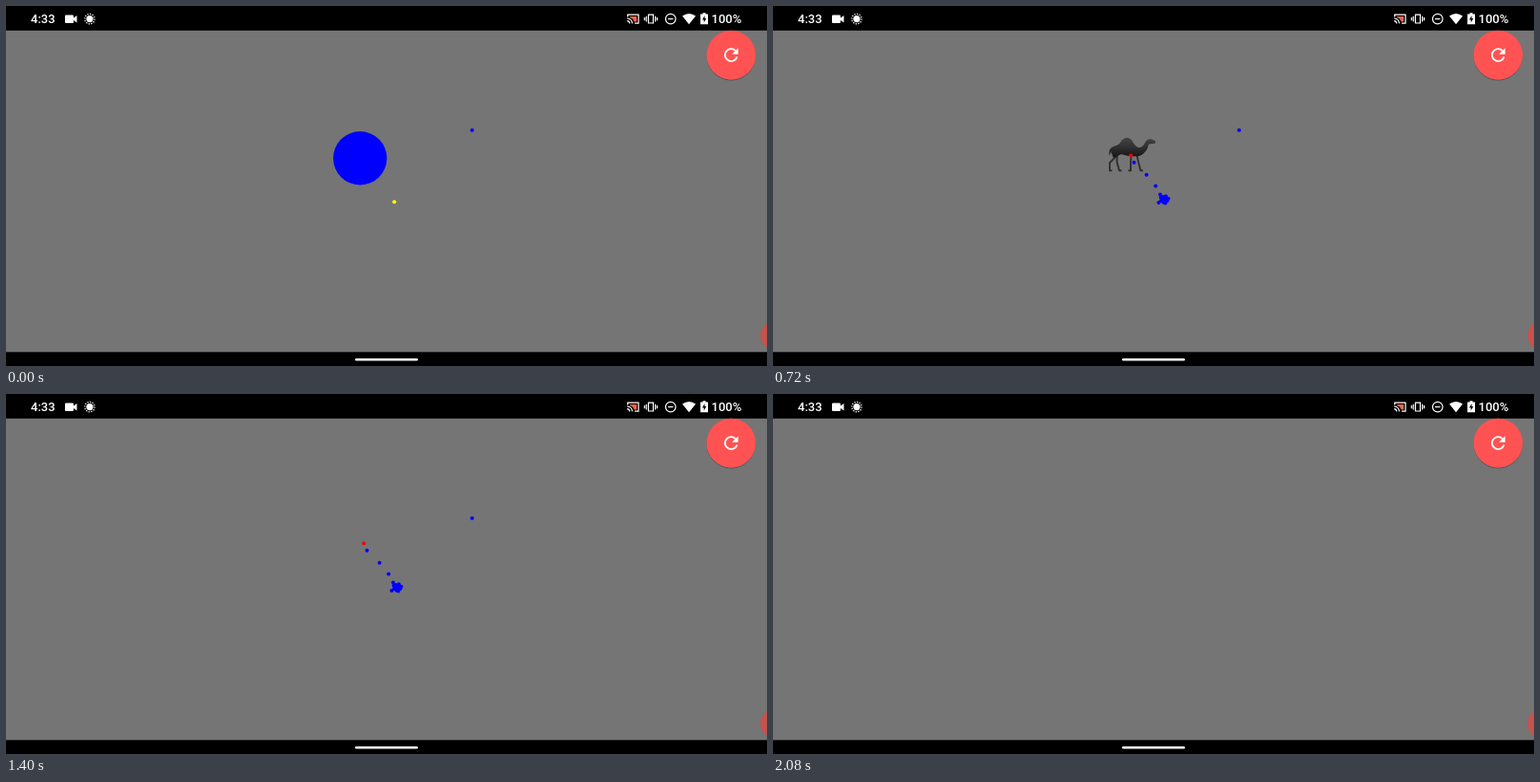
Recreate the animation shown at these times as an HTML page. Size 800 by 379 pixels, loop 2.96 s.

```html
<!DOCTYPE html>
<html lang="en">
<head>
<meta charset="utf-8">
<style>
html, body { margin: 0; width: 100%; height: 100%; overflow: hidden; background: #000; }
svg { display: block; width: 800px; height: 379px; }
text { font: 500 13px Roboto, sans-serif; fill: #fff; }
.line { fill: none; stroke: #fff; stroke-width: 1.2; }
</style>
</head>
<body>
<svg viewBox="0 0 800 379">
  <defs>
    <linearGradient id="fur" x2="0" y2="1">
      <stop stop-color="#444"/><stop offset=".5" stop-color="#2e2e2e"/><stop offset="1" stop-color="#141414"/>
    </linearGradient>
    <filter id="shadow" x="-20%" y="-20%" width="140%" height="140%">
      <feDropShadow dx="0" dy=".8" stdDeviation=".7" flood-opacity=".4"/>
    </filter>
  </defs>

  <rect y="25.8" width="800" height="338.5" fill="#757575"/>
  <rect x="367" y="371" width="66" height="2.4" rx="1.2" fill="#fff"/>

  <!-- status bar -->
  <text x="26" y="18.4">4:33</text>
  <text x="741.5" y="18.4">100%</text>
  <g fill="#fff">
    <rect x="62" y="9.5" width="9" height="8.5" rx="1"/>
    <path d="M71 12.5l3.5-2.5v7.500L71 15z"/>
    <circle cx="88" cy="13.600" r="3.600"/>
    <circle class="line" cx="88" cy="13.600" r="5.200" pathLength="24" stroke-dasharray="1"/>
    <path d="M718 19.200 711 10.500q7-5 14 0z"/>
    <path d="M732.500 8.500v-1.200h3v1.200h2.500v10.700h-8v-10.700z"/>
  </g>
  <path d="M734.500 10 732 14.600h1.700v3l2.500-4.500h-1.700z"/>
  <path d="M656 11h7v5.600h-2.500q-1-3.500-4.500-4.600z" fill="#f0644a"/>
  <path class="line" d="M653.600 11.500V9.200h11.300v9h-4M653 13q5 .3 5.400 5.400M653 15.700q2.500.3 2.700 2.700"/>
  <path class="line" d="M675.400 9.200h5v8.800h-5zM673.200 10.700v5.800M682.600 10.700v5.800M671.300 12v3.200M684.500 12v3.200"/>
  <g class="line"><circle cx="698.700" cy="13.600" r="5.300"/><path d="M696 13.600h5.400"/></g>

  <circle data-show="0 280" cx="372.200" cy="160.200" r="28.200" fill="#00f"/>
  <g data-show="280 1280" stroke-linejoin="round">
    <path d="M357 152 360 159 354 165V173.300h2.500M362 154 361.500 164 364 173.300h2.500M377 154 376 164V173.300h-2.500M382 154 384 164 386.500 173.300h2.500"
      fill="none" stroke="#303030" stroke-width="1.900"/>
    <path d="M354 158Q351 149 361 147Q365 145 367 141Q372 136 377 141Q380 147 384 149Q389 149 391 144Q393 140 397 140L402 142V144.500L395 145.500Q393 155 385 158Q375 159 366 156L358 160L355 153Z" fill="url(#fur)"/>
  </g>
  <rect data-show="1800 2080" x="216" y="25.800" width="368.700" height="318.700" fill="#008000"/>
  <g id="dots"></g>

  <circle cx="808.500" cy="347" r="15.600" fill="#c1544f"/>
  <g transform="translate(762.300 51.600)">
    <circle r="25.800" fill="#ff5252" filter="url(#shadow)"/>
    <path class="line" style="stroke-width: 1.84px" d="M6.200 1.800A6.440 6.440 0 1 1 4.500-4.600"/>
    <path d="M7.400-7.400v6.500H.9z" fill="#fff"/>
  </g>
</svg>
<script>
const LOOP = 2960, CLEAR = 2080;
const dots = document.getElementById('dots');

function addDot(x, y, color, from, to = CLEAR) {
  const dot = document.createElementNS('http://www.w3.org/2000/svg', 'circle');
  const attrs = { cx: x, cy: y, r: 2, fill: color, 'data-show': `${from} ${to}` };
  for (const key in attrs) dot.setAttribute(key, attrs[key]);
  dots.append(dot);
}

addDot(490, 130.8, '#00f', 0);
addDot(408.2, 206.3, '#ff0', 0, 280);

// a drag: circles near the press point, then speeds away to the release
addDot(405.5, 207, '#00f', 40);
for (let i = 0; i < 14; i++) {
  const a = i * 2.4, r = 1.2 * Math.sqrt(i);
  addDot(411.3 + r * Math.cos(a), 203.8 + r * Math.sin(a), '#00f', 60 + i * 20);
}
for (let i = 0; i < 4; i++) {
  const u = i / 3;
  addDot(407 - 27.5 * u ** 1.6, 198.5 - 33.8 * u ** 1.2, '#00f', 340 + i * 25);
}
addDot(376.2, 157.3, '#f00', 440);

const timed = [...document.querySelectorAll('[data-show]')].map(el => {
  const [from, to] = el.dataset.show.split(' ').map(Number);
  return { el, from, to };
});

const start = performance.now();
function draw(now) {
  const t = Math.max(0, now - start) % LOOP;
  for (const { el, from, to } of timed)
    el.style.visibility = t >= from && t < to ? 'visible' : 'hidden';
  requestAnimationFrame(draw);
}
draw(start);
</script>
</body>
</html>
```
